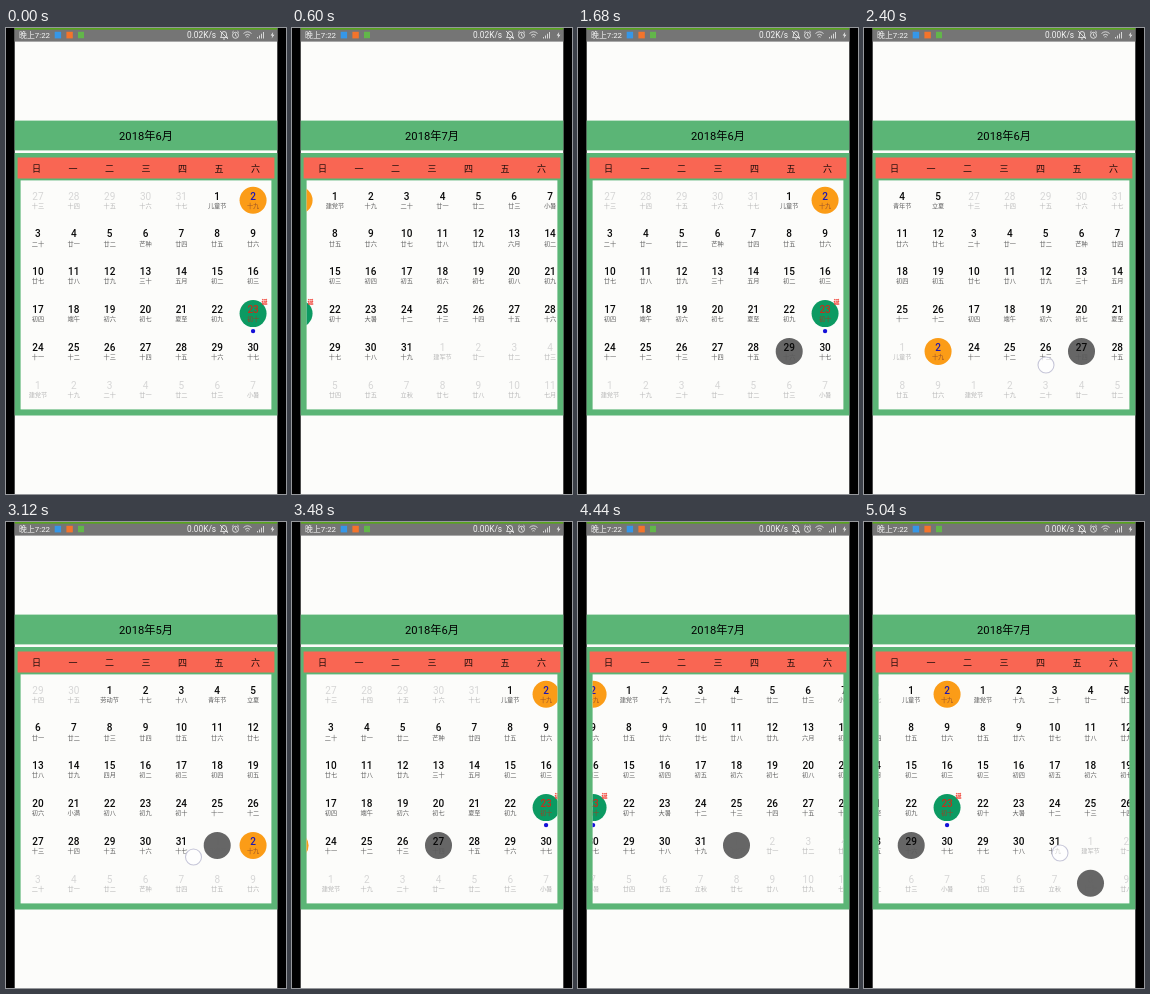
These frames come from a looping animation (280x466 px, 5160 ms). An HTML page:

```html
<!DOCTYPE html>
<html lang="zh-CN">
<head>
<meta charset="utf-8">
<title>日历</title>
<style>
  html, body { margin: 0; width: 100%; height: 100%; overflow: hidden; background: #000; }
  svg { display: block; width: 100vw; height: 100vh; }
  text { font-family: Roboto, "Noto Sans CJK SC", "Noto Sans CJK", sans-serif; text-anchor: middle; }
  #title { font-size: 11.2px; fill: #000; }
  .status { font-size: 8.3px; fill: #f4f4f4; text-anchor: start; }
  #clock { font-size: 7.9px; }
  .week { font-size: 9px; fill: #1c0c0a; }
  .day { font-size: 10px; font-weight: 500; fill: #0a0a0a; }
  .lunar { font-size: 6.2px; fill: #5c5c5c; }
  .cell circle { fill: none; }
  .muted .day { fill: #d6d6d6; font-weight: 400; }
  .muted .lunar { fill: #b6b6b6; }
  .today circle { fill: #fb9c17; }
  .today .day { fill: #2018b0; }
  .today .lunar { fill: #96502a; }
  .marked circle { fill: #0c9a62; }
  .marked .day { fill: #c4301c; }
  .marked .lunar { fill: #a03c24; }
  .cell.picked circle { fill: #666; }
  .muted.picked text { fill: #666; }
  .badge { font-size: 6px; font-weight: 700; fill: #f03428; }
  .icon { fill: none; stroke: #f0f0f0; stroke-width: .8; }
</style>
</head>
<body>
<svg viewBox="0 0 280 466">
  <defs><clipPath id="view"><rect x="14.6" y="152.4" width="250.8" height="229"/></clipPath></defs>
  <rect x="8.7" width="262.6" height="466" fill="#fcfcfa"/>
  <rect x="8.7" width="262.6" height="13.6" fill="#757575"/>
  <rect x="8.7" width="262.6" height="1.6" fill="#58a51c"/>
  <text class="status" id="clock" x="13" y="10.4">晚上7:22</text>
  <rect x="48.7" y="3.8" width="6.4" height="6.6" fill="#3597e8"/>
  <rect x="60.4" y="3.8" width="6.4" height="6.6" fill="#f4742b"/>
  <rect x="72" y="3.8" width="6" height="6.4" fill="#62b64a"/>
  <text class="status" id="speed" x="181" y="10.4">0.02K/s</text>
  <g class="icon">
    <path d="M214.5 9.5h7l-1-1.5v-2a2.4 2.4 0 0 0-5 0v2zM217 11h2M214 3l8 8"/>
    <circle cx="229.5" cy="7.3" r="3"/>
    <path d="M229.5 5.5v2l1.3.8M226 4.6l1.6-1.5M233 4.6l-1.6-1.5"/>
    <path d="M237.5 5.5q4-3.4 8 0M239 7.3q2.5-2 5 0M240.4 9.1q1.1-.9 2.2 0"/>
    <path d="M251.5 10.5v-1.5M253.5 10.5v-3M255.5 10.5v-4.8M257.5 10.5v-6.5"/>
  </g>
  <path d="M267.2 4l-2.5 3.6h1.8l-.9 3 2.8-3.9h-1.8z" fill="#f0f0f0"/>
  <rect x="8.7" y="92.6" width="262.6" height="29.8" fill="#5bb576"/>
  <text id="title" x="140" y="112"></text>
  <rect x="8.7" y="125" width="262.6" height="262.5" fill="#5bb576"/>
  <rect x="11.6" y="129.5" width="256.8" height="21" fill="#f96653"/>
  <g id="weekdays"></g>
  <rect x="14.6" y="152.4" width="250.8" height="229" fill="#fcfcfa"/>
  <g clip-path="url(#view)"><g id="strip"></g></g>
  <circle id="touch" r="8" fill="#fff" fill-opacity=".7" stroke="#c6c6d8" stroke-width="1.1"/>
</svg>
<script>
const LOOP = 5160, STEP = 120, LEFT = 14, PAGE = 251, COL = PAGE / 7, TOP = 172.7, ROW = 37.8;
const YEAR = 2018, FIRST_MONTH = 5;
const $ = id => document.getElementById(id);

function add(parent, tag, attrs, text) {
  const el = document.createElementNS("http://www.w3.org/2000/svg", tag);
  for (const key in attrs) el.setAttribute(key, attrs[key]);
  if (text) el.textContent = text;
  return parent.appendChild(el);
}

const festivals = {
  "5-1": "劳动节", "5-4": "青年节", "5-5": "立夏", "5-21": "小满",
  "6-1": "儿童节", "6-6": "芒种", "6-18": "端午", "6-21": "夏至",
  "7-1": "建党节", "7-7": "小暑", "7-23": "大暑", "8-1": "建军节", "8-7": "立秋"
};
// First days of the lunar months: [month, day, name].
const newMoons = [[4, 16, "三月"], [5, 15, "四月"], [6, 14, "五月"], [7, 13, "六月"], [8, 11, "七月"]];
const utc = (month, day) => Date.UTC(YEAR, month - 1, day);

function lunarName(month, day) {
  const festival = festivals[month + "-" + day];
  if (festival) return festival;
  const time = utc(month, day);
  const moon = newMoons.filter(([m, d]) => utc(m, d) <= time).pop();
  const n = (time - utc(moon[0], moon[1])) / 864e5 + 1;
  if (n === 1) return moon[2];
  if (n === 20) return "二十";
  if (n === 30) return "三十";
  return "初十廿"[Math.floor((n - 1) / 10)] + "一二三四五六七八九十"[(n - 1) % 10];
}

function buildPage(index) {
  const month = FIRST_MONTH + index;
  const lead = new Date(utc(month, 1)).getUTCDay();
  return Array.from({ length: 42 }, (_, i) => {
    const date = new Date(utc(month, 1 - lead + i));
    const m = date.getUTCMonth() + 1, d = date.getUTCDate();
    const x = LEFT + index * PAGE + (i % 7 + .5) * COL;
    const y = TOP + Math.floor(i / 7) * ROW;
    const today = m === 6 && d === 2, marked = month === 6 && m === 6 && d === 23;
    const kind = today ? "today" : marked ? "marked" : m !== month ? "muted" : "";
    const cell = add($("strip"), "g", { class: "cell " + kind, transform: `translate(${x} ${y})` });
    add(cell, "circle", { cy: -.5, r: 13.5 });
    add(cell, "text", { class: "day", y: -1.1 }, String(d));
    add(cell, "text", { class: "lunar", y: 7.2 }, lunarName(m, d));
    if (marked) {
      add(cell, "text", { class: "badge", x: 11.5, y: -9.8 }, "诞");
      add(cell, "circle", { cy: 17, r: 2.2, style: "fill:#1410d8" });
    }
    return cell;
  });
}

[..."日一二三四五六"].forEach((name, i) =>
  add($("weekdays"), "text", { class: "week", x: 30.5 + i * 36.5, y: 144.2 }, name));
const pages = [0, 1, 2].map(buildPage);

// travel: distance dragged at each step; the finger lifts after its last touch point.
const swipes = [
  { at: 240, from: 1, to: 2, pick: [4, 5], travel: [0, 75, 194, 240, 250, PAGE], touch: [[205, 332], [148, 339]] },
  { at: 1200, from: 2, to: 1, pick: [4, 3], travel: [0, 85, 203, 244, PAGE], touch: [[149.5, 341], [200, 330]] },
  { at: 2280, from: 1, to: 0, pick: [4, 3], travel: [0, 78, 198, 243, PAGE], touch: [[138, 345], [182, 337]] },
  { at: 3120, from: 0, to: 1, pick: [4, 5], travel: [0, 85, 203, 244, PAGE], touch: [[187.5, 335], [130, 342]] },
  { at: 4080, from: 1, to: 2, pick: [4, 5], travel: [0, 72, 182, 232, PAGE], touch: [[205, 332], [145, 339]] },
  { at: 4920, from: 2, to: 1, pick: [5, 3], travel: [0, 87], touch: [[142, 356], [196, 331]] }
];

function render(time) {
  let position = 1, shown = 1, finger = null;
  const picks = [];
  for (const { at, from, to, pick, travel, touch } of swipes) {
    if (time < at) break;
    const step = Math.floor((time - at) / STEP);
    const moved = travel[Math.min(step, travel.length - 1)];
    position = from + (to - from) * moved / PAGE;
    shown = step >= 2 ? to : from;
    finger = touch[step];
    picks[from] = pick[0] * 7 + pick[1];
  }
  $("strip").setAttribute("transform", `translate(${-position * PAGE} 0)`);
  pages.forEach((cells, p) => cells.forEach((cell, i) => cell.classList.toggle("picked", picks[p] === i)));
  $("title").textContent = `${YEAR}年${FIRST_MONTH + shown}月`;
  $("speed").textContent = time < 2160 ? "0.02K/s" : "0.00K/s";
  $("touch").style.display = finger ? "" : "none";
  if (finger) $("touch").setAttribute("transform", `translate(${finger})`);
}

const start = performance.now();
function tick() {
  render((performance.now() - start) % LOOP);
  requestAnimationFrame(tick);
}
tick();
</script>
</body>
</html>
```
